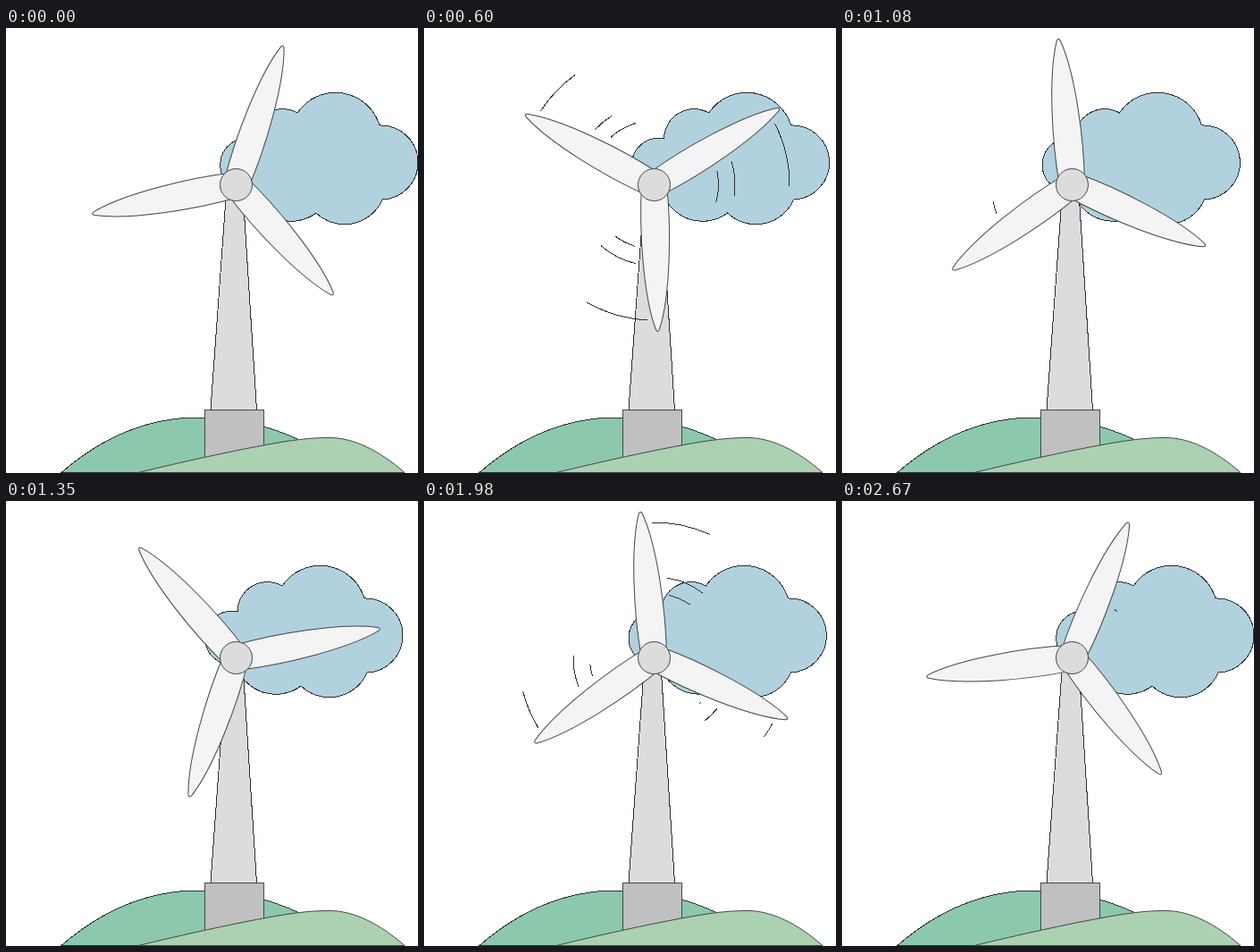
An HTML page for the animation above (2700 ms loop, 461 by 498 pixels).

```html
<!DOCTYPE html>
<html lang="en">
<head>
<meta charset="utf-8">
<title>Wind turbine</title>
<style>
  html, body { margin: 0; width: 100%; height: 100%; overflow: hidden; background: #fff; }
  svg { display: block; width: 461px; height: 498px; }
  svg * { stroke: #414747; stroke-width: 1; }
  svg .crisp, svg .trail { stroke: #2b2f2f; shape-rendering: crispEdges; }
  .trail { fill: none; }
</style>
</head>
<body>
<svg viewBox="0 0 461 498">
  <path id="cloud" class="crisp" fill="#b1d1de" d="M274 183A30 30 0 1 1 276 124A33.5 33.5 0 0 1 326 95A51.5 51.5 0 0 1 418 109A41.5 41.5 0 0 1 421 192A46 46 0 0 1 347 207A47 47 0 0 1 274 183Z"/>
  <path class="crisp" fill="#8cc8ac" d="M62 497.5C110 456 160 436 215 436C262 436 300 448 326 460L330 497.5Z"/>
  <path class="crisp" fill="#dcdcdc" d="M247 176L229 427.5H280.5L264.5 176Z"/>
  <rect fill="#c0c0c0" x="222.5" y="427.5" width="66" height="64"/>
  <path fill="#abd1b1" d="M148 497.5C200 485 250 474 288 467C320 461 340 458.5 362 458.5C389 458.5 418 473 446 497.5Z"/>
  <g id="rotor" fill="#f4f4f4"></g>
  <circle fill="#dcdcdc" cx="257.5" cy="175.5" r="18"/>
</svg>
<script>
const LOOP = 2700, STEP = 30, RAMP = 300;
const HUB = [257.5, 175.5];
const BLADE = 'M14 0C18.3 -50 15 -125 2 -162Q0 -166 -2 -162C-15 -125 -18.3 -50 -14 0Z';

// Trails behind a blade, as radius and first angle
const ARCS = [[90.5, 14.4], [151.5, 4.4], [72, 19]];
const SWEEP = 28;

const rotor = document.getElementById('rotor');
const cloud = document.getElementById('cloud');

function add(parent, tag, attrs) {
  const el = document.createElementNS('http://www.w3.org/2000/svg', tag);
  for (const key in attrs) el.setAttribute(key, attrs[key]);
  return parent.appendChild(el);
}

// Smooth progress from a to b
function ease(t, a, b) {
  const u = Math.min(1, Math.max(0, (t - a) / (b - a)));
  return u * u * (3 - 2 * u);
}

// A gust reaches blade after blade and arc after arc, and fades in the same order
function gust(t, on, off, blade, arc) {
  const start = on + 75 * blade + 45 * arc;
  const end = off + 125 * blade + 77 * arc;
  return ease(t, start, start + RAMP) - ease(t, end - RAMP, end);
}

function polar(r, deg) {
  const a = deg * Math.PI / 180;
  return (r * Math.sin(a)).toFixed(2) + ' ' + (-r * Math.cos(a)).toFixed(2);
}

const blades = [0, 1, 2].map(i => {
  const g = add(rotor, 'g', { transform: `rotate(${-120 * (i + 1)})` });
  add(g, 'path', { d: BLADE });
  return ARCS.map(() => add(g, 'path', { class: 'trail' }));
});

function draw(t) {
  const drift = 17 * (ease(t, 1500, 2650) - ease(t, 0, 1320));
  cloud.setAttribute('transform', `translate(${drift.toFixed(2)})`);
  rotor.setAttribute('transform', `translate(${HUB}) rotate(${18.6 - 360 * t / LOOP})`);

  // The second gust runs through the arcs in reverse
  blades.forEach((trails, i) => trails.forEach((trail, j) => {
    const [r, from] = ARCS[j];
    const len = SWEEP * (gust(t, 200, 790, i, 2 - j) + gust(t, 1690, 2330, i, j));
    trail.setAttribute('d', len > 1.5
      ? `M${polar(r, from)}A${r} ${r} 0 0 1 ${polar(r, from + len)}` : '');
  }));
}

const start = performance.now();
function tick() {
  const t = (performance.now() - start) % LOOP;
  draw(Math.floor(t / STEP) * STEP);
  requestAnimationFrame(tick);
}
tick();
</script>
</body>
</html>
```
